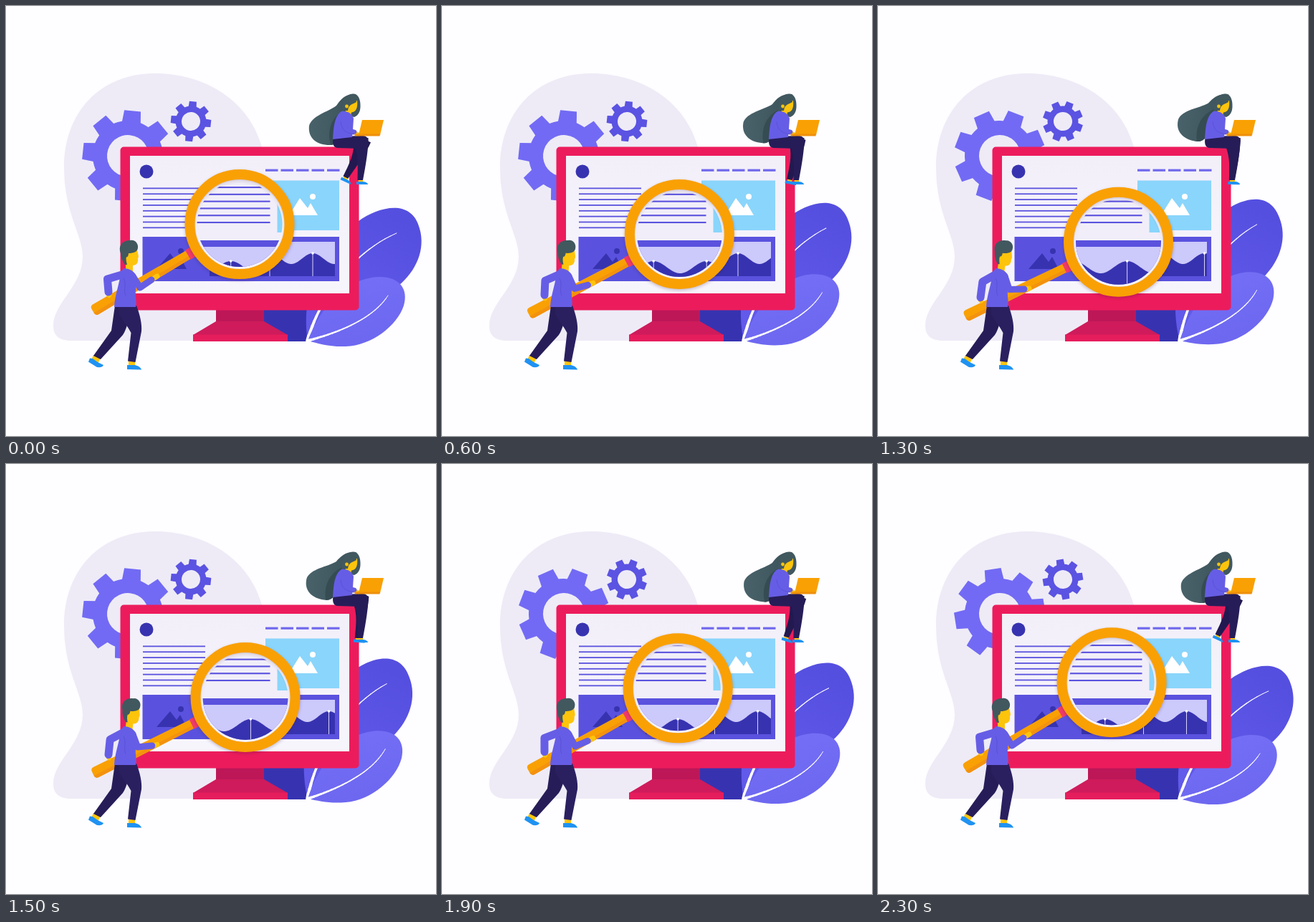
Write an HTML page with a canvas that moves like this. It is 600 px wide and 600 px high and loops after 2400 ms.

```html
<!DOCTYPE html>
<html lang="en">
<head>
<meta charset="utf-8">
<title>Search illustration</title>
<style>
html, body { margin: 0; width: 100%; height: 100%; overflow: hidden; background: #fefdff; }
canvas { display: block; width: 600px; height: 600px; }
</style>
</head>
<body>
<canvas id="stage" width="600" height="600"></canvas>
<script>
const ctx = document.getElementById('stage').getContext('2d');
const LOOP = 2400, STEP = 100, TAU = Math.PI * 2;
const C = {
  paper: '#fefdff', blob: '#eeebf7', gear: '#726af4', gearDark: '#5b53e2',
  red: '#ec1c5c', violet: '#5a52de', deep: '#3733b0', pale: '#ccc9fb',
  sky: '#8ad5fb', orange: '#f9a004', skin: '#fdc40c', shirt: '#665de6',
  navy: '#261d58', hair: '#41585f', shoe: '#1f92f2'
};

const rad = d => d * Math.PI / 180;
const mix = (a, b, k) => a + (b - a) * k;
const mixPt = (a, b, k) => [mix(a[0], b[0], k), mix(a[1], b[1], k)];

function shape(d, color) {
  ctx.fillStyle = color;
  ctx.fill(new Path2D(d));
}
function rect(x, y, w, h, color) {
  ctx.fillStyle = color;
  ctx.fillRect(x, y, w, h);
}
function disc(x, y, r, color) {
  ctx.fillStyle = color;
  ctx.beginPath();
  ctx.arc(x, y, r, 0, TAU);
  ctx.fill();
}
function limb(pts, width, color) {
  ctx.strokeStyle = color;
  ctx.lineWidth = width;
  ctx.lineCap = ctx.lineJoin = 'round';
  ctx.beginPath();
  pts.forEach(p => ctx.lineTo(p[0], p[1]));
  ctx.stroke();
}
function grad(x0, y0, x1, y1, a, b) {
  const g = ctx.createLinearGradient(x0, y0, x1, y1);
  g.addColorStop(0, a);
  g.addColorStop(1, b);
  return g;
}
function turn(x, y, deg, draw) {
  ctx.save();
  ctx.translate(x, y);
  ctx.rotate(rad(deg));
  ctx.translate(-x, -y);
  draw();
  ctx.restore();
}

function gear(x, y, outer, root, hole, tooth, deg, color) {
  ctx.save();
  ctx.translate(x, y);
  ctx.rotate(rad(deg));
  ctx.fillStyle = color;
  for (let i = 0; i < 8; i++) {
    ctx.beginPath();
    ctx.moveTo(root - 6, -tooth * 0.58);
    ctx.lineTo(outer, -tooth / 2);
    ctx.lineTo(outer, tooth / 2);
    ctx.lineTo(root - 6, tooth * 0.58);
    ctx.fill();
    ctx.rotate(TAU / 8);
  }
  disc(0, 0, root, color);
  disc(0, 0, hole, C.blob);
  ctx.restore();
}

function backdrop(t) {
  rect(0, 0, 600, 600, C.paper);
  shape('M358 200C340 130 275 94 208 94C130 94 81 150 81 225C81 290 107 318 107 350C107 390 66 415 66 446C66 460 74 467 92 467L300 467L358 400Z', C.blob);
  const deg = 6 + t * 360 / LOOP;
  gear(170, 209, 63, 49, 29, 23, deg, C.gear);
  gear(258, 161, 28, 21.5, 13, 10, deg, C.gearDark);
}

// Vein that tapers from the stem to the tip
function vein(p, w) {
  const at = (i, u) => (1 - u) ** 3 * p[0][i] + 3 * u * (1 - u) ** 2 * p[1][i]
    + 3 * u * u * (1 - u) * p[2][i] + u ** 3 * p[3][i];
  for (let i = 0; i < 24; i++) {
    const a = i / 24, b = (i + 1) / 24;
    limb([[at(0, a), at(1, a)], [at(0, b), at(1, b)]], mix(w, 0.9, Math.sqrt(a)), C.paper);
  }
}

function leaves(k) {
  shape('M360 420L424 420L421 468L360 468Z', C.deep);
  turn(421, 467, -6.2 * k, () => {
    shape('M421 467C411 400 440 322 492 300C520 280 566 268 577 310C586 340 572 370 548 390C510 425 450 440 421 467Z',
      grad(540, 290, 440, 440, '#554fe0', '#625aea'));
    vein([[421, 467], [434, 415], [480, 345], [545, 317]], 5.5);
  });
  turn(421, 467, -4 * k, () => {
    shape('M421 467C440 418 476 380 519 378C549 377 562 395 555 418C546 446 510 474 474 475C452 476 436 471 421 467Z',
      grad(480, 385, 500, 475, '#736ef5', '#6d67f0'));
    vein([[421, 467], [455, 458], [510, 440], [533, 404]], 4);
  });
}

// Scrolling chart wave with a pin on each crest
function wave(x0, x1, bottom, mid, amp, gap, pin) {
  const y = x => mid - amp * Math.cos((x - pin) / gap * TAU);
  ctx.fillStyle = C.deep;
  ctx.beginPath();
  ctx.moveTo(x0, bottom);
  for (let x = x0; x <= x1; x++) ctx.lineTo(x, y(x));
  ctx.lineTo(x1, bottom);
  ctx.fill();
  for (let x = pin - 3 * gap; x <= x1; x += gap) {
    if (x < x0) continue;
    rect(x - 0.5, mid - amp, 1, bottom - mid + amp, '#d9d4f8');
    disc(x, mid - amp, 1.8, '#fff');
  }
}

function monitor(n) {
  rect(293, 424, 67, 20, '#bd1758');
  shape('M293 440L360 440L393 459L261 459Z', '#cf1b5b');
  rect(261, 458.5, 132, 9.5, '#e61d5d');
  ctx.fillStyle = C.red;
  ctx.beginPath();
  ctx.roundRect(159.5, 196.5, 333, 228, 5);
  ctx.fill();
  rect(173, 209, 306, 192, grad(0, 209, 0, 401, '#f2eff9', '#f7f5fc'));

  disc(196, 231, 9.5, C.deep);
  for (let i = 0; i < 5; i++) rect(362 + i * 21.5, 227.6, 17.5, 3.2, '#7069ec');
  for (let i = 0; i < 8; i++) rect(191, 253.5 + i * 7.85, 87, 1.8, C.violet);

  rect(362, 243.5, 103, 69.5, C.sky);
  shape('M395 292L410 268L421 282L425 275L435 292Z', '#fff');
  disc(428, 266, 4, '#fff');

  rect(190.5, 322, 274.5, 62, C.violet);
  shape('M210 367L229 345L238 357L243 350L252 367Z', C.deep);
  disc(244, 342, 4, C.deep);
  rect(284, 329, 175, 48, C.pale);
  ctx.save();
  ctx.beginPath();
  ctx.rect(284, 329, 175, 48);
  ctx.clip();
  wave(284, 459, 377, 352.5, 7.5, 60, 488 - n * 2.5);
  ctx.restore();
}

function magnifier(k, n) {
  const x = 326 + 9.8 * k, y = 304.5 + 25.5 * k;

  ctx.save();
  ctx.translate(x, y);
  ctx.rotate(Math.PI - rad(30.6 - 4.8 * k));
  shape('M83 -6.5L233 -8Q238 -8 238 -3L238 3Q238 8 233 8L83 6.5Z', C.orange);
  shape('M83 -6.5L233 -8Q238 -8 238 -3L83 -2Z', '#f3920f');
  rect(73, -7.5, 11, 15, '#f23b69');
  ctx.restore();

  disc(x, y, 66, '#faf8fe');
  ctx.save();
  ctx.beginPath();
  ctx.arc(x, y, 59.5, 0, TAU);
  ctx.clip();
  rect(240, 220, 190, 200, '#f1eef9');
  for (let i = 0; i < 6; i++) rect(240, 252 + i * 9.8, 128.5, 2.1, C.violet);
  rect(378.5, 230, 60, 86, C.sky);
  rect(240, 327, 190, 100, C.violet);
  rect(240, 336, 190, 80, C.pale);
  wave(240, 430, 415, 364.5, 8.5, 74, 387.7 - n * 74 / 24);
  ctx.restore();

  ctx.save();
  ctx.shadowColor = 'rgba(60,20,70,.25)';
  ctx.shadowBlur = 4;
  ctx.shadowOffsetY = 2;
  ctx.strokeStyle = C.orange;
  ctx.lineWidth = 14;
  ctx.beginPath();
  ctx.arc(x, y, 69.5, 0, TAU);
  ctx.stroke();
  ctx.restore();
}

function man(k) {
  // legs
  shape('M122 487L132 491L128 499L119 494Z', C.skin);
  shape('M117 491.5L121 492L128 497L136 501C135 504 131 504.5 127 504L115 496.5Z', C.shoe);
  shape('M152 418L174 418C172 436 169 450 163 459L132 493L122 488L147 453Z', C.navy);
  shape('M171 494L180 495L180 504L171 504Z', C.skin);
  shape('M169 501L180 501C184 502 188 504 189 507.5L169 507Z', C.shoe);
  shape('M158 418L182 418C187 431 190 444 189 454L180.5 497L170 495.5L174.5 456C170 447 162 438 158 430Z', '#2a2060');

  // head
  turn(174, 366, 8 * k, () => {
    shape('M167 342L183 340C184 346 186 350 184 352C185 358 182 362 177 362L177 371L167 370Z', C.skin);
    shape('M166 361C162 355 160 350 160 345C156 334 163 327 173 327C180 325 185 332 184 337C184 343 178 345 171 345C171 349 169 351 168 350C167 353 168 357 169 361Z', C.hair);
  });

  // torso and arms
  shape('M164 366C172 366 180 370 182 378L181 396C180 405 183 414 181 420L151 420C152 402 158 390 160 372Z', C.shirt);
  const elbowB = mixPt([141.5, 381], [146, 385], k);
  const wristB = mixPt([143, 399], [143, 407], k);
  limb([[wristB[0], wristB[1] + 4], [wristB[0] + 1, wristB[1] + 5]], 6, C.skin);
  limb([[165, 374], elbowB, wristB], 11, C.shirt);
  const elbowF = mixPt([187, 393], [183, 395.5], k);
  const wristF = mixPt([203, 382], [204, 395.5], k);
  const hand = mixPt([211, 377], [211, 394.5], k);
  limb([wristF, hand], 7, C.skin);
  limb([[177, 377], elbowF, wristF], 9, C.shirt);
  ctx.strokeStyle = '#5b51d8';
  ctx.lineWidth = 1;
  ctx.stroke(new Path2D('M164 380C169 388 163 396 167 404'));
}

function woman(k) {
  turn(483, 135, 8.5 * k, () => {
    shape('M488 123C474 122 467 130 461 139C449 148 427 153 423 167C421 184 433 194 452 194C464 194 468 182 471 168L478 148Z',
      grad(423, 165, 475, 165, '#49626a', '#3e555d'));
    shape('M470 146C456 155 447 171 453 194C464 193 468 182 471 168Z', '#354c53');
  });
  shape('M484 122.5C491 122 495 130 494.5 140C494.5 148 491 153 486 155L470 152C466 135 473 123 484 122.5Z', C.hair);
  shape('M475 137C480 136 486 133 490 132C491 141 489 148 482 148.5L481 154L473 152Z', C.skin);
  shape('M472 146C476 128 488 126 489 134C484 137 478 137 477 146Z', C.hair);
  disc(475.5, 140, 2.4, C.skin);

  const shin = (x, color) => {
    shape('M491 240L498 240L498 246L492 246Z', C.skin);
    shape('M489 245L497 245C501 245 504.5 246.5 505 249L489 249Z', C.shoe);
    shape(`M${x} 184L505.5 184C506 198 502 222 498 243L490.5 243C491 222 491 212 ${x + 1} 198Z`, color);
  };
  turn(493, 195, 25 * (1 - k), () => shin(485, '#221950'));
  shin(487, C.navy);
  shape('M457 183L492 181C502 180 505.5 183 505.5 189L496 199L462 198C456 197 455 190 457 183Z', C.navy);

  shape('M468 147C476 146 483 150 485 157L484 172L483 183L456 186C457 175 457 154 468 147Z', C.shirt);
  limb([[488, 177], [492, 179]], 4.5, C.skin);
  limb([[471, 158], [475, 173], [486, 176]], 6.5, C.shirt);
  ctx.strokeStyle = '#5b51d8';
  ctx.lineWidth = 1;
  ctx.stroke(new Path2D('M467 162C468 172 473 177 485 179'));
  shape('M497 159L527 159L522 180L492 180Z', C.orange);
  shape('M486 178.5L522 178.5L521.5 181.5L487 181.5Z', '#ee900c');
}

function draw(now) {
  const n = Math.floor(now % LOOP / STEP), t = n * STEP;
  const k = (1 + Math.cos((t - 1165) / LOOP * TAU)) / 2;
  backdrop(t);
  leaves(k);
  monitor(n);
  magnifier(k, n);
  man(k);
  woman(k);
}

const start = performance.now();
function tick() {
  draw(performance.now() - start);
  requestAnimationFrame(tick);
}
tick();
</script>
</body>
</html>
```
